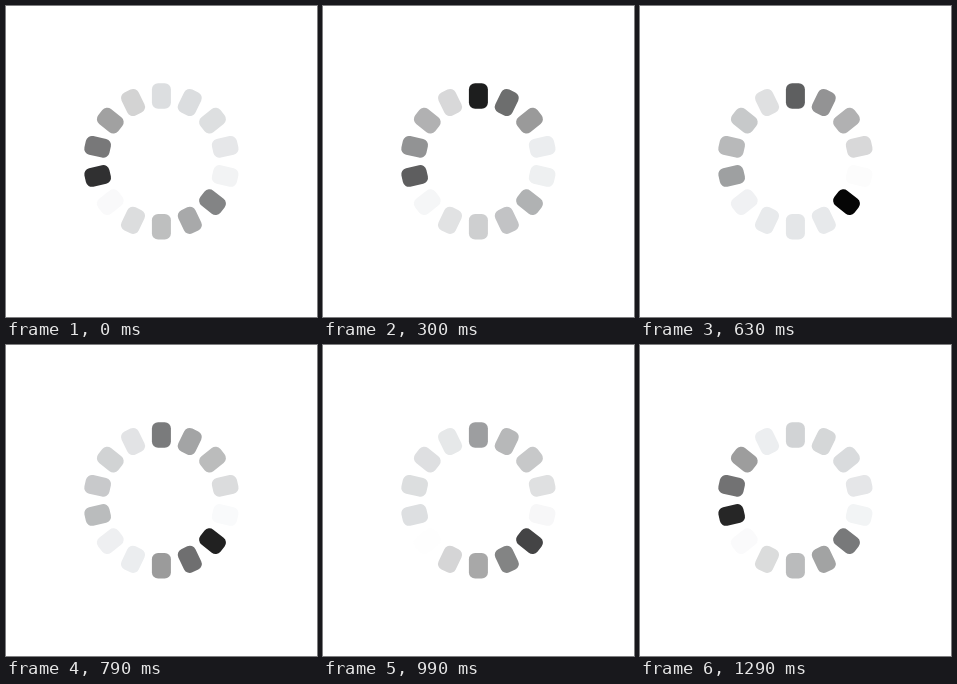
Write an HTML page with a canvas that moves like this. It is 311 px wide and 311 px high and loops after 1.35 s.

```html
<!DOCTYPE html>
<html lang="en">
<head>
<meta charset="utf-8">
<title>Loading ring</title>
<style>
  html, body { margin: 0; width: 100%; height: 100%; overflow: hidden; background: #fff; }
  canvas { display: block; width: 100vw; height: 100vh; }
</style>
</head>
<body>
<canvas id="stage" width="311" height="311"></canvas>
<script>
const ctx = document.getElementById('stage').getContext('2d');
const LOOP = 1350;
const COUNT = 14;
const GROUP = 5;
const STAGGER = 75;
const CENTER = 155.4;
const RADIUS = 65.4;
const TILE = { w: 19, h: 25.6, r: 6.2 };

// Each group's lead tile flashes first; its followers start ever lighter.
const groupStart = [92, 603, 1075];
const startLevel = [0, 100, 153, 210, 255];
const endColor = [236, 238, 240];

// The picture advances in uneven steps.
const steps = [0, 70, 120, 160, 200, 260, 330, 400, 490, 540, 590, 630, 690,
  740, 790, 860, 900, 950, 990, 1050, 1100, 1150, 1190, 1220, 1260, 1290];

function tileColor(index, time) {
  const place = index % GROUP;
  const start = groupStart[Math.floor(index / GROUP)] + place * STAGGER;
  const progress = ((time - start + LOOP) % LOOP) / LOOP;
  const from = startLevel[place];
  const rgb = endColor.map(to => Math.round(from + (to - from) * progress));
  return `rgb(${rgb.join(',')})`;
}

function drawTile(index, time) {
  ctx.save();
  ctx.translate(CENTER, CENTER);
  ctx.rotate(index * 2 * Math.PI / COUNT);
  ctx.fillStyle = tileColor(index, time);
  ctx.beginPath();
  ctx.roundRect(-TILE.w / 2, -RADIUS - TILE.h / 2, TILE.w, TILE.h, TILE.r);
  ctx.fill();
  ctx.restore();
}

function draw(now) {
  const elapsed = now % LOOP;
  const time = steps.filter(step => step <= elapsed).pop();
  ctx.fillStyle = '#fff';
  ctx.fillRect(0, 0, 311, 311);
  for (let i = 0; i < COUNT; i++) drawTile(i, time);
}

const origin = performance.now();
function tick() {
  draw(Math.max(0, performance.now() - origin));
  requestAnimationFrame(tick);
}
tick();
</script>
</body>
</html>
```
